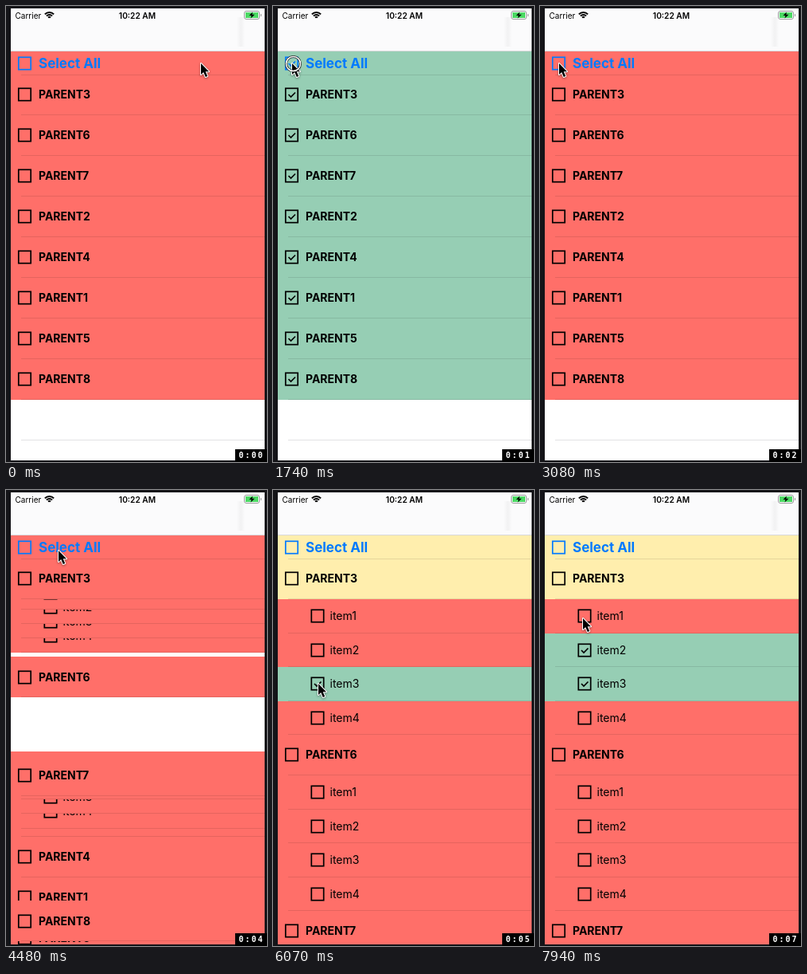
Recreate the animation shown at these times as an HTML page with a canvas. Size 328 by 572 pixels, loop 8 s.

```html
<!DOCTYPE html>
<html>
<head>
<meta charset="utf-8">
<style>
html, body { margin: 0; width: 328px; height: 572px; overflow: hidden; background: #141418; }
canvas { display: block; }
</style>
</head>
<body>
<canvas id="stage" width="328" height="572"></canvas>
<script>
const ctx = document.getElementById('stage').getContext('2d');
const LOOP = 8000;
const RED = '#ff6f69', GREEN = '#96ceb4', YELLOW = '#ffeead', BLUE = '#007aff';
const PARENTS = [3, 6, 7, 2, 4, 1, 5, 8].map(n => 'PARENT' + n);
const ROW = 51, ITEM = 42.5, TOP = 86;

const TICKS = [0, 740, 890, 990, 1140, 1290, 1440, 1590, 1740, 1890, 2040, 2930, 3080, 3180,
  3930, 4080, 4230, 4380, 4480, 4630, 4780, 5080, 5180, 5320, 5470, 5620, 5770, 5920, 6070,
  6210, 6350, 6490, 6600, 6750, 6900, 7350, 7650, 7790, 7940];
const SECONDS = [1140, 2040, 3180, 4080, 5080, 6210, 7350];
const CLICKS = [[1590, 1890], [2930, 3080], [4380, 4480], [5920, 6070], [6750, 6900]];
// Pointer path: time, x, y
const PATH = [[0, 245, 72], [640, 245, 72], [1590, 24, 72], [3830, 24, 72], [4380, 66, 76],
  [4980, 66, 76], [5320, 31, 252], [5770, 57, 243], [6070, 57, 243], [6600, 58, 193],
  [7550, 58, 193], [7940, 54, 161], [LOOP, 54, 161]];

const lerp = (a, b, p) => a + (b - a) * p;
const ease = p => { p = Math.min(1, Math.max(0, p)); return p * p * (3 - 2 * p); };

function rect(color, x, y, w, h) {
  ctx.fillStyle = color;
  ctx.fillRect(x, y, w, h);
}

function text(str, x, y, font, color = '#000', family = 'Inter, sans-serif') {
  ctx.font = font + ' ' + family;
  ctx.fillStyle = color;
  ctx.fillText(str, x, y);
}

function line(points, color, width) {
  ctx.beginPath();
  points.forEach(p => ctx.lineTo(...p));
  ctx.strokeStyle = color;
  ctx.lineWidth = width;
  ctx.stroke();
}

function checkbox(x, y, checked, color) {
  ctx.strokeStyle = color;
  ctx.lineWidth = 1.7;
  ctx.strokeRect(x - 7.7, y - 7.7, 15.4, 15.4);
  if (checked) line([[x - 4, y], [x - 1, y + 3], [x + 4.5, y - 2.5]], color, 1.7);
}

function row(top, height, fill, label, checked, kind) {
  const y = Math.round(top), bottom = Math.round(top + height);
  if (y > 570) return;
  rect(fill, 6, y, 319, bottom - y);
  rect('rgba(0,0,0,.1)', 19, bottom - 1, 306, 1);
  const mid = Math.round(top + height / 2 - .1);
  const color = kind === 'all' ? BLUE : '#000';
  checkbox(kind === 'item' ? 56 : 23.5, mid, checked, color);
  if (kind === 'all') text(label, 41, mid + 6, '700 17px', color);
  else if (kind === 'item') text(label, 71.5, mid + 5, '400 14px');
  else text(label, 41, mid + 5, '700 14px');
}

function items(start, end, p, picked) {
  for (let i = 3; i >= 0; i--) {
    const on = picked.includes(i);
    row(lerp(start, end + i * ITEM, p), ITEM, on ? GREEN : RED, 'item' + (i + 1), on, 'item');
  }
}

function table(t) {
  const all = t >= 1740 && t < 3080;
  const open = t > 4380, p = open ? ease((t - 4345) / 300) : 0;
  const picked = [...(t >= 6070 ? [2] : []), ...(t >= 6900 ? [1] : [])];
  const fill = all ? GREEN : RED;
  const head = picked.length ? YELLOW : fill;
  const shift = i => p * 4 * ITEM * (i === 0 ? 0 : i === 1 || i === 7 ? 1 : 2);
  const parent = i => row(TOP + i * ROW + shift(i), ROW, i ? fill : head, PARENTS[i], all, 'parent');

  rect('#fff', 6, 57, 319, 513);
  if (!open) rect('#e2e2e4', 19, 544, 306, 1);
  [3, 4, 5, 6, 7].forEach(parent);
  if (open) {
    items(305.5, TOP + 2 * ROW + 4 * ITEM, p, []);
    items(TOP, TOP + ROW, p, picked);
  }
  [2, 1, 0].forEach(parent);
  row(57, 30, head, 'Select All', all, 'all');
}

function statusBar() {
  rect('#fbfbfc', 6, 3, 319, 54);
  rect('#d8d8da', 6, 56, 319, 1);
  const glow = ctx.createLinearGradient(290, 0, 300, 0);
  glow.addColorStop(0, 'rgba(240,240,241,0)');
  glow.addColorStop(.5, '#f2f2f3');
  glow.addColorStop(1, 'rgba(240,240,241,0)');
  rect(glow, 290, 14, 10, 37);

  text('Carrier', 11.5, 15.5, '400 10px');
  ctx.textAlign = 'center';
  text('10:22 AM', 165, 15.5, '600 10.2px');
  ctx.textAlign = 'left';

  for (const r of [2, 5, 8]) {
    ctx.beginPath();
    ctx.arc(54.5, 16, r, -Math.PI * .75, -Math.PI * .25);
    ctx.lineWidth = 2;
    ctx.strokeStyle = '#000';
    ctx.stroke();
  }

  ctx.beginPath();
  ctx.roundRect(299.5, 6.5, 19, 10, 2.5);
  ctx.lineWidth = 1;
  ctx.strokeStyle = '#9a9a9c';
  ctx.stroke();
  rect('#4cd964', 301, 8, 16, 7);
  rect('#9a9a9c', 320, 10, 1, 3);
  ctx.fillStyle = '#000';
  ctx.beginPath();
  [[310, 7.5], [305.5, 12], [308.5, 12], [307.5, 15.5], [312.5, 10.8], [309.3, 10.8]]
    .forEach(q => ctx.lineTo(...q));
  ctx.fill();
}

function pointer(t) {
  const k = PATH.findIndex(q => q[0] > t);
  const [a, b] = [PATH[k - 1], PATH[k]];
  const p = ease((t - a[0]) / (b[0] - a[0]));
  const x = lerp(a[1], b[1], p), y = lerp(a[2], b[2], p);

  ctx.save();
  ctx.translate(x, y);
  ctx.beginPath();
  [[0, 0], [0, 14], [3.2, 11], [5.8, 17], [8.2, 16], [5.7, 10.2], [10, 10.2]]
    .forEach(q => ctx.lineTo(...q));
  ctx.closePath();
  ctx.lineJoin = 'round';
  ctx.shadowColor = 'rgba(0,0,0,.4)';
  ctx.shadowBlur = 3;
  ctx.shadowOffsetY = 1;
  ctx.strokeStyle = '#fff';
  ctx.lineWidth = 2;
  ctx.stroke();
  ctx.shadowColor = 'transparent';
  ctx.fillStyle = '#000';
  ctx.fill();
  if (CLICKS.some(([from, to]) => t >= from && t < to)) {
    for (const [color, width] of [['#222', 3], ['#fff', 1.5]]) {
      ctx.beginPath();
      ctx.arc(1.5, .5, 9, 0, 7);
      ctx.strokeStyle = color;
      ctx.lineWidth = width;
      ctx.stroke();
    }
  }
  ctx.restore();
}

function counter(t) {
  rect('#000', 288, 556, 40, 16);
  ctx.letterSpacing = '2px';
  text('0:0' + SECONDS.filter(s => t >= s).length, 292.5, 567, '700 10px', '#fff',
    '"DejaVu Sans Mono", monospace');
  ctx.letterSpacing = '0px';
}

function draw(now) {
  const time = now % LOOP;
  const t = TICKS.filter(s => s <= time).pop();
  rect('#141418', 0, 0, 328, 572);
  ctx.save();
  ctx.beginPath();
  ctx.rect(6, 3, 319, 567);
  ctx.clip();
  table(t);
  statusBar();
  ctx.restore();
  pointer(t);
  counter(t);
}

function loop() {
  draw(performance.now());
  requestAnimationFrame(loop);
}
loop();
</script>
</body>
</html>
```
